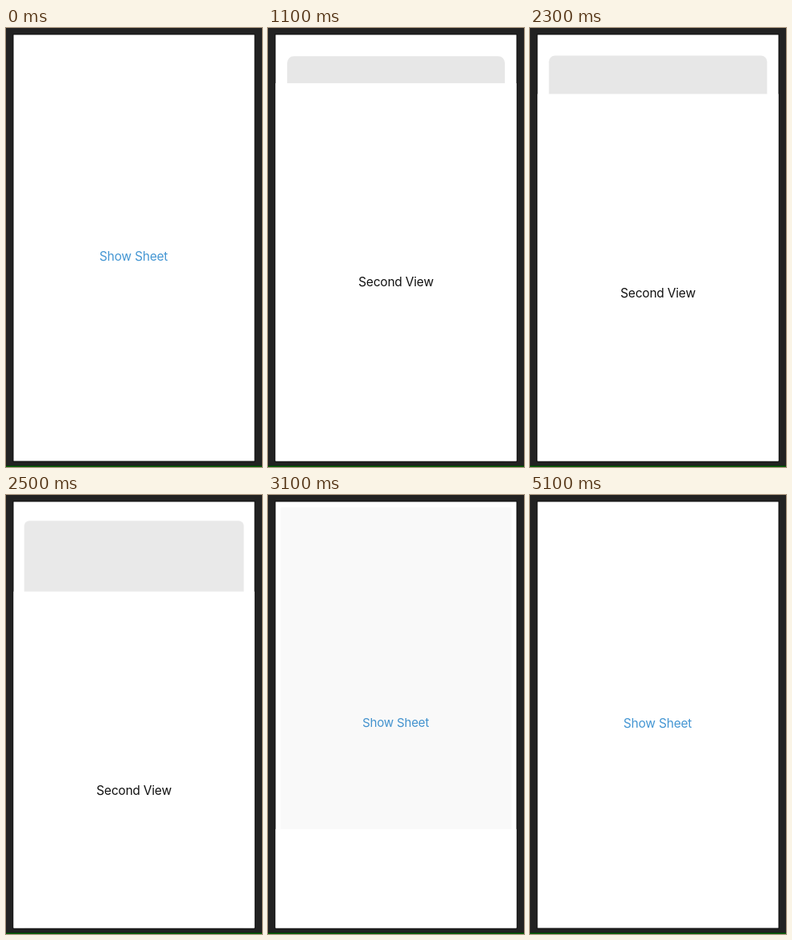
Recreate the animation shown at these times as an HTML page with a canvas. Size 320 px wide and 549 px high, loop 5.8 s.

```html
<!DOCTYPE html>
<html lang="en">
<head>
<meta charset="utf-8">
<title>Sheet presentation</title>
<style>
  html, body { margin: 0; height: 100%; overflow: hidden; background: #222; }
  canvas { display: block; width: 320px; height: 549px; }
</style>
</head>
<body>
<canvas id="stage"></canvas>
<script>
const LOOP = 5800, STEP = 100;
const SCREEN = { left: 9.5, top: 8.5, right: 310.5, bottom: 541.5 };
const OPEN = 46, CLOSED = 542;
const RISE_AT = 782, DRAG_AT = 2300, RELEASE_AT = 2960;
const OMEGA = 0.0152;        // spring rate per ms
const DRAG_SPEED = 0.191;    // px per ms
const FONT = '15.5px Inter, "Open Sans", sans-serif';

const canvas = document.getElementById('stage');
const ctx = canvas.getContext('2d');
const ratio = window.devicePixelRatio || 1;
canvas.width = 320 * ratio;
canvas.height = 549 * ratio;

const mix = (a, b, p) => a + (b - a) * p;

// Critically damped spring that starts at rest
function spring(from, to, elapsed) {
  const x = OMEGA * elapsed;
  return to + (from - to) * (1 + x) * Math.exp(-x);
}

const dragged = t => 82.5 + (t - DRAG_AT) * DRAG_SPEED;

function sheetTop(t) {
  if (t < RISE_AT) return CLOSED;
  if (t < DRAG_AT) return spring(CLOSED, OPEN, t - RISE_AT);
  if (t < RELEASE_AT) return dragged(t);
  return spring(dragged(RELEASE_AT), CLOSED, t - RELEASE_AT);
}

function rect(color, left, top, right, bottom) {
  ctx.fillStyle = color;
  ctx.fillRect(left, top, right - left, bottom - top);
}

function label(text, color, x, baseline) {
  ctx.font = FONT;
  ctx.letterSpacing = '-0.2px';
  ctx.textAlign = 'center';
  ctx.textBaseline = 'alphabetic';
  ctx.fillStyle = color;
  ctx.fillText(text, x, baseline);
}

function drawBezel() {
  rect('#222222', 0, 0, 320, 549);
  rect('#0b3a0b', 0, 547, 320, 548);
  rect('#0a620a', 0, 548, 320, 549);
  rect('#0b0b0b', SCREEN.left - 1, SCREEN.top - 1, SCREEN.right + 1, SCREEN.bottom + 1);
  rect('#ffffff', SCREEN.left, SCREEN.top, SCREEN.right, SCREEN.bottom);
}

// The page behind shrinks and dims as the sheet opens (p: 0 open, 1 closed)
function drawPage(p) {
  const left = mix(24.5, 12.5, p);
  const top = mix(36.6, 8, p);
  const scale = mix(0.897, 1, p);
  const radius = Math.max(2, mix(9, -9, p));

  ctx.save();
  ctx.translate(160, 275);
  ctx.scale(scale, scale);
  label('Show Sheet', '#4496d3', -0.5, 15.5);
  ctx.restore();

  ctx.fillStyle = `rgba(0, 0, 0, ${0.1 * (1 - p)})`;
  ctx.beginPath();
  ctx.roundRect(left, top, 320 - 2 * left, CLOSED - top, [radius, radius, 0, 0]);
  ctx.fill();
}

function drawSheet(top) {
  rect('#ffffff', 0, top, 320, CLOSED);
  label('Second View', '#111111', 160, top + 254.2);
}

function draw(t) {
  const top = sheetTop(t);
  ctx.setTransform(ratio, 0, 0, ratio, 0, 0);
  drawBezel();
  ctx.save();
  ctx.beginPath();
  ctx.rect(SCREEN.left, SCREEN.top, SCREEN.right - SCREEN.left, SCREEN.bottom - SCREEN.top);
  ctx.clip();
  drawPage((top - OPEN) / (CLOSED - OPEN));
  if (top < CLOSED) drawSheet(top);
  ctx.restore();
}

const start = performance.now();
function tick() {
  const t = (performance.now() - start) % LOOP;
  draw(Math.floor(t / STEP) * STEP);
  requestAnimationFrame(tick);
}
tick();
</script>
</body>
</html>
```
